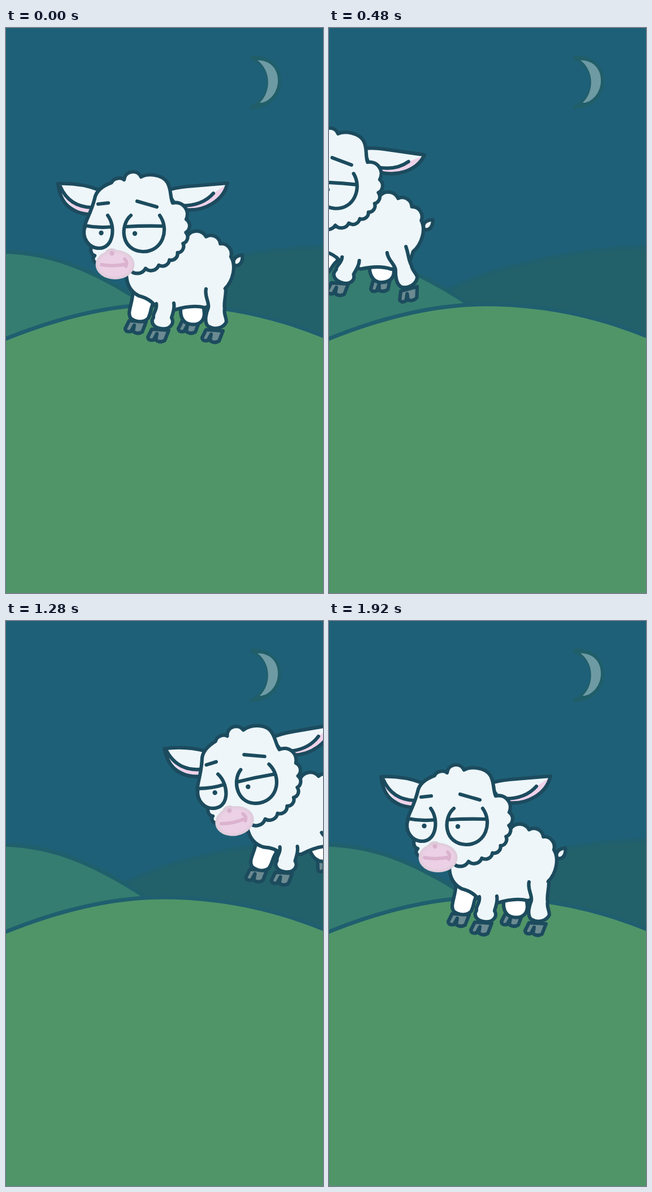
Animation, 561 px wide and 998 px high, one loop 2080 ms. Source, as an HTML page:

```html
<!DOCTYPE html>
<html lang="en">
<head>
<meta charset="utf-8">
<title>Leaping lamb</title>
<style>
  html, body { margin: 0; width: 100%; height: 100%; overflow: hidden; background: #1e6078; }
  svg { display: block; width: 100%; height: 100%; }
  .ink { stroke: #1c4b5e; stroke-width: 6.2; stroke-linecap: round; stroke-linejoin: round; fill: none; }
  .wool { fill: #eef6f9; }
  .far { fill: #fff; }
  .hoof { fill: #6b8a91; }
  .blush { fill: #efd2e9; }
</style>
</head>
<body>
<svg viewBox="0 0 561 998" preserveAspectRatio="none">
  <defs>
    <path id="hoof" class="ink hoof" d="M8 2L1 16Q2 23 11 21L17 10L15 21Q22 27 31 22L38 4Z"/>
    <radialGradient id="snout">
      <stop offset=".75" stop-color="#ecd0e5"/>
      <stop offset="1" stop-color="#dccbd9"/>
    </radialGradient>
  </defs>

  <!-- night sky and hills -->
  <rect width="561" height="998" fill="#1e6078"/>
  <path fill="#205e69" d="M434 49C470 46 488 72 487 95C486 122 465 143 432 143V138C474 118 470 70 432 55Z"/>
  <path fill="#6e9aa4" d="M445 57C470 57 483 75 481 97C479 118 462 133 449 132C470 112 469 75 445 57Z"/>
  <g stroke-width="7">
    <path fill="#23616a" stroke="#205f6d" d="M215 461C290 424 430 389 568 387V700H215Z"/>
    <path fill="#357d70" stroke="#20606c" d="M-10 395C72 396 144 420 248 488V700H-10Z"/>
    <path fill="#509568" stroke="#1f5f6f" d="M-8 552C80 516 180 488 277 488C380 488 480 510 569 547V1010H-8Z"/>
  </g>

  <g id="lamb">
    <g id="farFront">
      <use id="farHoof" href="#hoof" x="210" y="515"/>
      <path class="ink far" d="M225 462C224 490 213 502 221 513C232 521 246 520 252 512C258 500 255 494 262 484L250 464Z"/>
    </g>
    <g id="farHind">
      <use href="#hoof" x="304" y="515"/>
      <path class="ink far" d="M311 486C305 508 313 521 325 523C340 526 351 519 351 504L349 486Z"/>
    </g>

    <path id="body" class="ink wool"/>
    <path class="ink wool" d="M404 419C399 408 408 402 418 401C420 412 414 422 404 419Z"/>

    <g id="nearFront">
      <use id="nearHoof" href="#hoof" x="250" y="530"/>
      <path class="ink wool" d="M266 487C268 499 259 503 261 511C254 522 264 530 275 531C291 533 299 521 293 512C295 504 299 496 297 486"/>
    </g>
    <g id="nearHind">
      <use href="#hoof" x="346" y="531"/>
      <path class="ink wool" d="M354 461C351 474 360 484 358 494C354 504 350 520 358 527C370 534 385 530 390 519C390 510 385 506 387 496C385 486 389 476 389 462"/>
    </g>

    <g id="earLeft">
      <path class="wool" d="M92 275Q130 273 165 286L160 328Q100 325 92 275Z"/>
      <path class="blush" d="M96 285Q112 316 153 318V329Q112 326 96 285Z"/>
      <path class="ink" d="M165 286Q130 273 92 275Q98 326 147 329M96 280Q112 316 152 317"/>
    </g>
    <g id="earRight">
      <path class="wool" d="M286 287Q298 282 320 280L392 274C385 306 350 324 310 320Z"/>
      <path class="blush" d="M388 278L367 292Q346 315 318 315V321C355 322 382 306 388 278Z"/>
      <path class="ink" d="M286 287Q298 282 320 280L392 274C385 306 350 324 318 321M367 292Q344 318 298 313"/>
    </g>

    <path id="head" class="ink wool"/>
    <g class="ink">
      <path class="wool" d="M140 350C133 370 146 389 165 389C190 389 195 351 180 331M140 349Q165 354 188 351"/>
      <path d="M221 331C201 348 203 394 243 395C277 395 290 356 272 331M211 351Q245 349 278 350"/>
      <path d="M163 311L181 309M232 306L267 316"/>
    </g>
    <g fill="#1c4b5e">
      <circle cx="168.500" cy="362" r="4.200"/>
      <circle cx="228" cy="363" r="4.200"/>
    </g>
    <ellipse cx="187" cy="399" rx="12" ry="10" fill="#dccbd9"/>
    <ellipse cx="193" cy="418" rx="34.500" ry="26" fill="url(#snout)"/>
    <circle cx="187.500" cy="398" r="4" fill="#d9b2cd"/>
    <path fill="none" stroke="#dbb3cf" stroke-width="6" stroke-linecap="round" d="M169 418Q190 422 213 417M210 408Q216 414 212 421"/>
  </g>
</svg>
<script>
const STEP = 160, LAST = 12, WRAP = 6;
const set = (id, name, value) => document.getElementById(id).setAttribute(name, value);

// Woolly edge: equal bumps along a quadratic curve
function bumps(start, control, end, count) {
  const pointAt = t => start.map((s, i) =>
    (1 - t) ** 2 * s + 2 * t * (1 - t) * control[i] + t * t * end[i]);
  let path = "L" + start;
  for (let i = 1; i <= count; i++) {
    const from = pointAt((i - 1) / count), to = pointAt(i / count);
    const radius = 0.6 * Math.hypot(to[0] - from[0], to[1] - from[1]);
    path += `A${radius} ${radius} 0 0 1 ${to}`;
  }
  return path;
}

set("body", "d", "M215 400L260 380" + bumps([322, 366], [375, 362], [398, 404], 3) +
  "C408 420 402 446 388 460L382 484L352 494Q330 488 298 498L265 492Q255 478 235 473Q213 462 213 434Z");
set("head", "d", "M157 301C159 290 168 280 187 273C190 265 203 263 209 268" +
  "C211 252 232 249 239 263C252 256 276 259 285 272C293 284 290 299 295 309C312 305 326 321 319 338" +
  bumps([319, 338], [325, 425], [219, 427], 7) +
  "L190 432L160 416C153 411 153 406 157 402C150 400 149 392 151 386L139 350C143 336 151 325 157 301Z");

// The lamb springs off to the left, then glides in from the right and lands
function poseAt(step) {
  if (step < WRAP) {
    const air = 1 - Math.exp(-0.6 * step);
    return { x: step && 29 - 86 * step, y: -93 * air, tilt: 5 * Math.sqrt(air), ear: 10 * air, air };
  }
  const left = LAST - step;
  const air = Math.min(1, left / 2);
  const glide = 14 * Math.sin(Math.PI * Math.min(left, 4) / 4);
  return { x: 49 * left + glide, y: 0.8 * left ** 2 - 20.5 * left, tilt: -11 * air, ear: 6 * air, air };
}

const turn = (id, angle, x, y, lift = 0) =>
  set(id, "transform", `translate(0 ${-lift}) rotate(${angle} ${x} ${y})`);

function draw() {
  const step = Math.floor(performance.now() / STEP) % (LAST + 1);
  const { x, y, tilt, ear, air } = poseAt(step);
  const farSwing = 17 * Math.sqrt(air), nearSwing = 11 * air;
  set("lamb", "transform", `translate(${x} ${y}) rotate(${tilt} 225 340)`);
  turn("earLeft", ear, 154, 305);
  turn("earRight", ear, 297, 298);
  turn("farFront", farSwing, 240, 465, 3 * air);
  turn("nearFront", nearSwing, 280, 470, 6 * air);
  turn("farHind", -18 * air, 330, 482, 5 * air);
  turn("nearHind", -29 * air, 365, 492, 3 * air);
  // Front hooves stay level with the ground
  turn("farHoof", -tilt - farSwing, 232, 518);
  turn("nearHoof", -tilt - nearSwing, 274, 533);
  requestAnimationFrame(draw);
}
draw();
</script>
</body>
</html>
```
